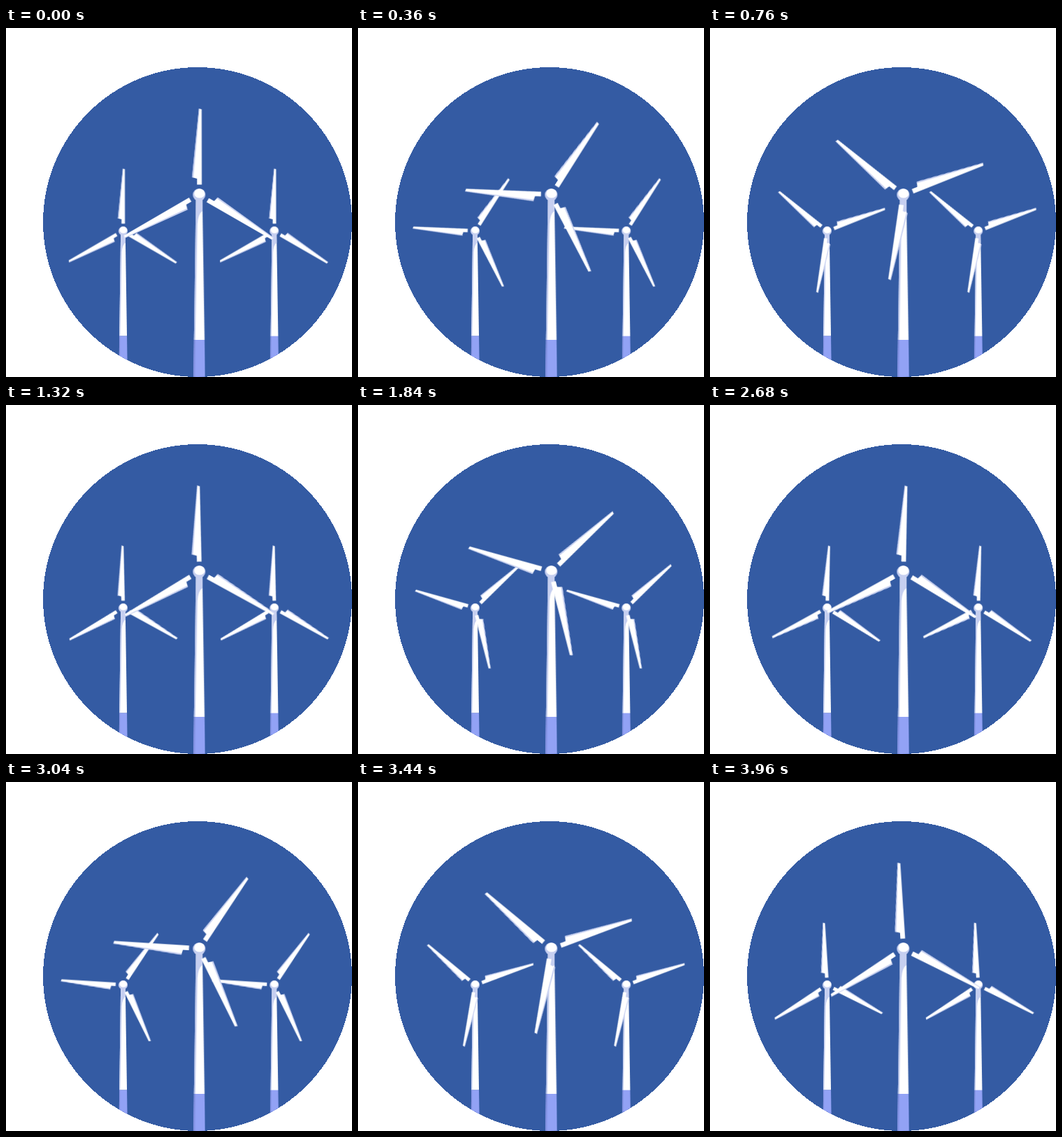
An HTML page that plays this animation: 495x498 px, repeating every 4000 ms.

```html
<!DOCTYPE html>
<html lang="en">
<head>
<meta charset="utf-8">
<title>Wind turbines</title>
<style>
  html, body { margin: 0; width: 100%; height: 100%; overflow: hidden; background: #fff; }
  svg { display: block; width: 495px; height: 498px; }
  .white { fill: #fff; }
  .shade { fill: #c6cff0; }
  .base { fill: #92a2f5; }
  .base-shade { fill: #8392e2; }
</style>
</head>
<body>
<svg viewBox="0 0 495 498">
  <defs>
    <clipPath id="disc"><circle cx="274" cy="277" r="221"/></clipPath>
  </defs>
  <circle cx="274" cy="277" r="221" fill="#345ba3" shape-rendering="crispEdges"/>
  <g id="scene" clip-path="url(#disc)"></g>
</svg>
<script>
  const LOOP = 4000, STEPS = 100;

  // Every part is drawn around the hub at 0,0.
  const blade = angle => `
    <g transform="rotate(${angle})">
      <path class="white" d="M-.2-123 3.6-122 3.8-14.5H-3V-23L-10-25Z"/>
      <path class="shade" d="M-.2-123.2-10.2-25-8.2-24.4.6-122.8Z"/>
    </g>`;

  const tower = `
    <path class="white" d="M-4.5 4H4.6L7.8 207H-7.2Z"/>
    <path class="shade" d="M-4.5 4H4.6L5 23Q-1.5 27-2.4 42L-5.4 207H-7.2Z"/>
    <path class="base" d="M-7.2 207H7.8L8.6 262H-7.9Z"/>
    <path class="base-shade" d="M-7.2 207H-5.4L-6 262H-7.9Z"/>`;

  const hub = `
    <circle class="shade" r="9"/>
    <ellipse class="white" cx=".6" cy="-2" rx="7.6" ry="6.6"/>`;

  const turbine = (x, y, scale) => `
    <g transform="translate(${x} ${y}) scale(${scale})">
      ${tower}
      <g class="rotor">${[0, 120, 240].map(blade).join('')}</g>
      ${hub}
    </g>`;

  document.getElementById('scene').innerHTML =
    turbine(167.4, 289.7, 0.724) +
    turbine(383.7, 289.7, 0.724) +
    turbine(276.3, 238, 1);

  for (const rotor of document.querySelectorAll('.rotor')) {
    rotor.animate(
      { transform: ['rotate(0deg)', 'rotate(360deg)'] },
      { duration: LOOP, iterations: Infinity, easing: `steps(${STEPS})` }
    );
  }
</script>
</body>
</html>
```
